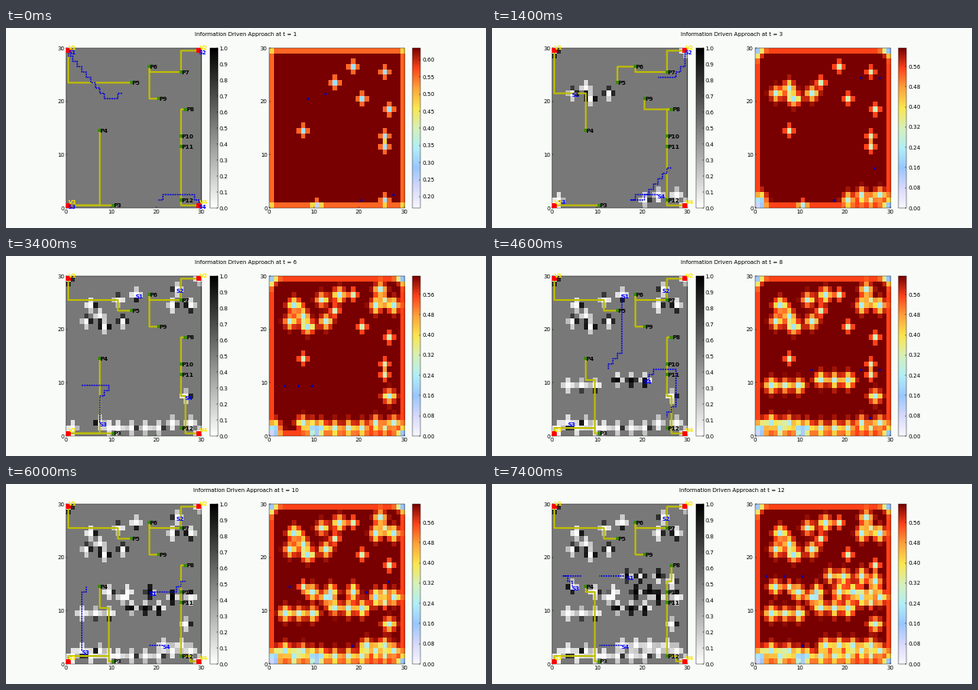
A matplotlib script that plays this animation: 600 by 250 pixels, repeating every 8 s.

```python
import matplotlib.pyplot as plt
import numpy as np
from matplotlib.animation import FuncAnimation
from matplotlib.colors import LinearSegmentedColormap

N = 30
STEPS, FRAMES, TICK = 12, 40, 200
PX = 0.72  # points per pixel at 100 dpi

CORNERS = [(0, 29), (29, 29), (0, 0), (29, 0)]
PLACES = {"P3": (10, 0), "P4": (7, 14), "P5": (14, 23), "P6": (18, 26),
          "P7": (25, 25), "P8": (26, 18), "P9": (20, 20), "P10": (25, 13),
          "P11": (25, 11), "P12": (25, 1)}
BENDS = {"a": (7, 21), "b": (11, 25), "c": (25, 7), "d": (26, 1),
         "e": (9, 10), "f": (9, 1), "g": (27, 0), "h": (9, 13), "i": (25, 15)}
NODES = {**PLACES, **BENDS, **{f"V{i + 1}": c for i, c in enumerate(CORNERS)}}

# vehicle routes, two steps each: "|" leaves a node vertically, "-" horizontally
NORTH = ["V1 | b | P5", "V2 - P7 - P6 | P9"]
ROUTES = [
    ["V1 | P5", NORTH[1], "V3 - P3", "V3 - P4", "P8 - P12 | V4"],
    ["V1 | a | P4", "P5 | P6 | P7 | V2", "P9 | P8 - P12 | V4", "V3 - P3"],
    NORTH + ["V3 - P3", "V3 - P4", "P8 - c - d | V4"],
    NORTH + ["V3 | f", "P4 | e | P3", "P8 - c - d | V4"],
    NORTH + ["V3 | f", "P4 | e | P3", "P8 - P12 - g - V4"],
    NORTH + ["V3 | f", "P4 | h | P3", "P8 | i | P12 - g - V4"],
]

# sensor trips, step by step: sensor -> cells visited and measured
TRIPS = [
    {0: [(8, 20), (12, 21)], 3: [(27, 2), (20, 1)]},
    {0: [(7, 22), (4, 21)], 2: [(1, 1)], 3: [(23, 2)]},
    {1: [(27, 24), (23, 24)], 3: [(17, 1), (26, 7)]},
    {0: [(5, 24), (11, 25)], 2: [(11, 1), (14, 1)]},
    {0: [(15, 26)], 1: [(24, 27)], 2: [(9, 1), (7, 2)]},
    {2: [(9, 9), (3, 9)]},
    {2: [(5, 1), (3, 2)], 3: [(14, 10), (20, 10)]},
    {0: [(12, 12)], 3: [(23, 12), (27, 12), (25, 3)]},
    {0: [(9, 13), (18, 13)], 3: [(21, 3)]},
    {0: [(21, 13), (26, 15)], 2: [(4, 14)], 3: [(18, 3)]},
    {0: [(23, 16), (16, 16)], 3: [(15, 3)]},
    {0: [(10, 16)], 2: [(2, 16), (6, 16)], 3: [(10, 3)]},
]

HEAT = LinearSegmentedColormap.from_list("heat", [
    "#f7f7ff", "#d6d8fb", "#98c6ff", "#b0eef8", "#d4f0b8",
    "#fae64c", "#ffa238", "#ff4218", "#780000"])


def elbows(chain):
    """Corner points of a route such as 'V1 | b | P5'."""
    tokens = chain.split()
    points = [NODES[tokens[0]]]
    for way, name in zip(tokens[1::2], tokens[2::2]):
        (x0, y0), end = points[-1], NODES[name]
        points += [(x0, end[1]) if way == "|" else (end[0], y0), end]
    return np.array(points) + .5


def walk(points):
    """Grid path: each leg runs straight first, then in stairs."""
    path = [points[0]]
    for x1, y1 in points[1:]:
        x, y = path[-1]
        level = True
        while (x, y) != (x1, y1):
            dx, dy = x1 - x, y1 - y
            level = abs(dx) > abs(dy) if abs(dx) != abs(dy) else not level
            x, y = (x + np.sign(dx), y) if level else (x, y + np.sign(dy))
            path.append((x, y))
    return np.array(path) + .5


def stops(trip):
    """Visited cells, with one more halfway along long level legs."""
    mids = [((a + c) // 2, b) for (a, b), (c, d) in zip(trip, trip[1:])
            if b == d and abs(a - c) >= 6]
    return trip + mids


def measure(logit, cell, rng):
    c, r = cell
    cluster = 14 <= c <= 24 and 10 <= r <= 17
    dark = .7 if cluster else .08 if r < 5 else .33
    logit[r, c] = 4 if cluster and rng.random() < dark else -4
    for x, y in ((c + 1, r), (c - 1, r), (c, r + 1), (c, r - 1)):
        if 0 <= x < N and 0 <= y < N:
            sign = 1 if rng.random() < dark else -1
            logit[y, x] += sign * rng.uniform(1, 2.4)


def information(belief):
    """Own entropy plus a share of the four neighbours' entropy."""
    p = np.clip(belief, 1e-6, 1 - 1e-6)
    e = -(p * np.log2(p) + (1 - p) * np.log2(1 - p))
    for c, r in PLACES.values():
        e[r, c] = 0
    q = np.pad(e, 1)
    return .315 * e + .08 * (q[:-2, 1:-1] + q[2:, 1:-1] + q[1:-1, :-2] + q[1:-1, 2:])


def simulate():
    rng = np.random.default_rng(8)
    logit = np.full((N, N), .12)
    spots = list(CORNERS)
    states = []
    for t, trips in enumerate(TRIPS):
        belief = 1 / (1 + np.exp(-logit))
        paths = [walk([spots[s]] + trip) for s, trip in trips.items()]
        looks = [c for trip in trips.values() for c in stops(trip)]
        states.append((belief, information(belief), list(spots), paths, looks))
        for s, trip in trips.items():
            spots[s] = trip[-1]
        for cell in looks + (CORNERS if t == 0 else []):
            measure(logit, cell, rng)
    return states


def make_map(ax, cmap):
    img = ax.imshow(np.zeros((N, N)), cmap=cmap, vmin=0, vmax=1, origin="lower",
                    extent=(0, N, 0, N), aspect="auto", interpolation="nearest")
    ax.set(xticks=range(0, 31, 10), yticks=range(0, 31, 10))
    bar = fig.colorbar(img, ax=ax, fraction=.15, pad=.05, aspect=20)
    bar.outline.set_linewidth(.3)
    for a in (ax, bar.ax):
        a.tick_params(length=1.2, width=.3, pad=1.3, direction="in")
        for s in a.spines.values():
            s.set_linewidth(.3)
    return img, bar


def label(text, cell, color, dx=.1, dy=0, z=6):
    return grid_ax.text(cell[0] + .5 + dx, cell[1] + .5 + dy, text, color=color, zorder=z,
                        fontsize=7.1 * PX, weight="bold", va="center_baseline")


def mark(cell, color, size):
    grid_ax.plot(cell[0] + .5, cell[1] + .5, "s", color=color, ms=size * PX, mew=0, zorder=4)


plt.rcParams.update({"font.family": "DejaVu Sans", "font.size": 6.9 * PX})
fig, (grid_ax, heat_ax) = plt.subplots(1, 2, figsize=(6, 2.5), dpi=100, facecolor="#f8fbf8")
fig.subplots_adjust(left=.125, right=.9, bottom=.1, top=.9, wspace=.2)
title = fig.text(.5, .968, "", ha="center", va="center")
grid_img, grid_bar = make_map(grid_ax, "binary")
heat_img, heat_bar = make_map(heat_ax, HEAT)
grid_bar.set_ticks(np.arange(11) / 10)

STATES = simulate()
dots, = heat_ax.plot([], [], "o", color="#0000b0", ms=3 * PX, mew=0)
for i, c in enumerate(CORNERS):
    mark(c, "red", 5.5)
    label(f"V{i + 1}", c, "#ffe800", dy=.55)
for name, c in PLACES.items():
    mark(c, "#3c8a00", 3.5)
    label(name, c, "black")
tags = [label(f"S{i + 1}", c, "blue", z=5) for i, c in enumerate(CORNERS)]
moving = []


def draw(frame):
    t = int((frame + .5) * STEPS / FRAMES)
    belief, info, spots, paths, looks = STATES[t]
    title.set_text(f"Information Driven Approach at t = {t + 1}")
    grid_img.set_data(belief)
    heat_img.set_data(info)
    low, high, gap = (.167, .635, .05) if t < 2 else (0, .633, .08)
    ticks = np.arange(np.ceil(low / gap), high / gap) * gap
    heat_img.set_clim(low, high)
    heat_bar.set_ticks(ticks, labels=[f"{v:.2f}" for v in ticks])
    while moving:
        moving.pop().remove()
    for chain in ROUTES[t // 2]:
        moving.extend(grid_ax.plot(*elbows(chain).T, color="#bfbf00", lw=2.1 * PX,
                                   zorder=3, snap=False))
    for path in paths:
        moving.extend(grid_ax.plot(*path.T, color="#0000e0", lw=1.5 * PX,
                                   ls=(0, (1.3, .7)), zorder=3, snap=False))
    for tag, (c, r) in zip(tags, spots):
        tag.set_position((c + .4, r + .2))
    dots.set_data(*(np.array(looks).T + .5))
    grid_ax.set(xlim=(0, N), ylim=(0, N))
    return []


anim = FuncAnimation(fig, draw, frames=FRAMES, init_func=lambda: [],
                     interval=TICK, repeat=True, repeat_delay=0, blit=False)
plt.show()
```
